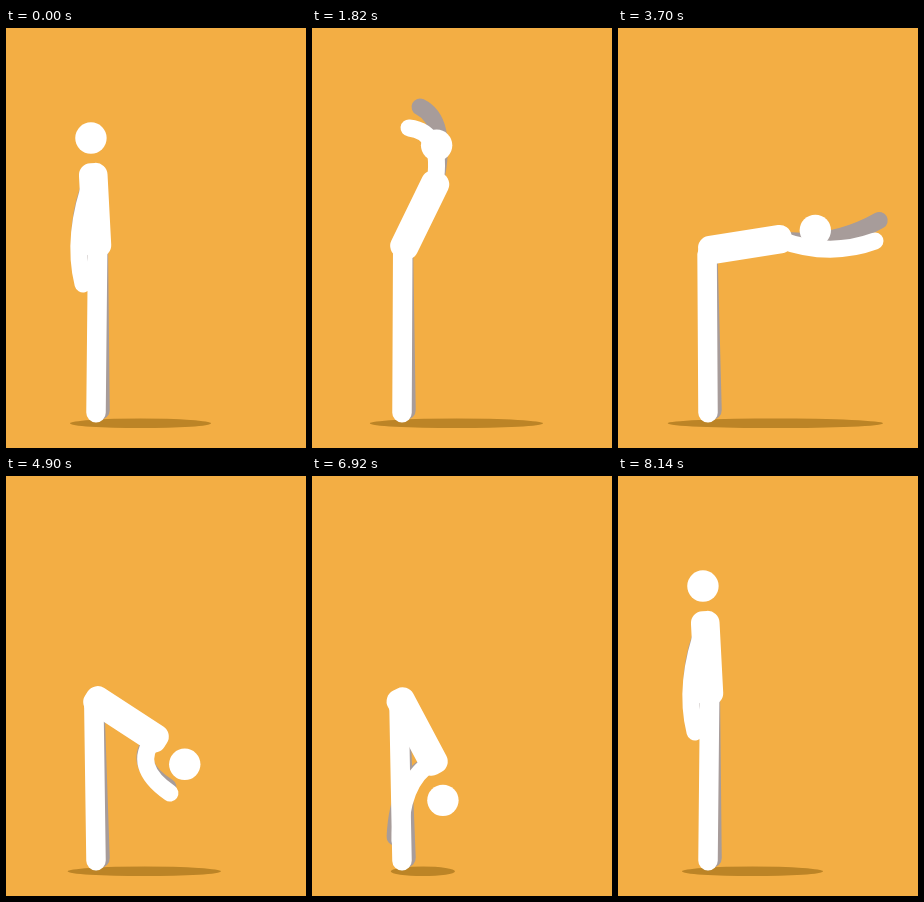
An HTML page with a canvas that plays this animation: 300 by 420 pixels, repeating every 8160 ms.

```html
<!DOCTYPE html>
<html lang="en">
<head>
<meta charset="utf-8">
<title>Forward bend</title>
<style>
html, body { margin: 0; width: 100%; height: 100%; overflow: hidden; background: #f3ae44; }
canvas { display: block; }
</style>
</head>
<body>
<canvas width="300" height="420"></canvas>
<script>
const ctx = document.querySelector('canvas').getContext('2d');
const LOOP = 8160, LEAD = 20, HIP = [89, 220.6];
const WHITE = '#fff', GREY = '#a79c9a';

// A pose is reached at time t and kept for hold ms. Angles are degrees
// clockwise from upright; shadow is the x of the shadow's right end.
const pose = (t, hold, lean, tilt, shadow, elbow, hand) =>
  (hold ? [t, t + hold] : [t]).map(t => ({ t, values: [lean, tilt, shadow, ...elbow, ...hand] }));

const keys = [
  pose(0, 40, -3, 0.9, 205, [65, 208], [77, 256]),        // stand
  pose(840, 0, 2, -1, 213, [155, 160], [212, 150]),       // arms forward
  pose(1840, 0, 26, -7, 231, [131.5, 103.5], [97, 100]),  // hands behind head
  pose(2260, 160, 37, -8, 239, [143, 105], [136, 53]),    // stretch up
  pose(3060, 0, 53, -8, 247.5, [171, 128], [155, 97]),    // lean
  pose(3720, 0, 81, -0.6, 265, [211, 230], [257, 213]),   // reach out
  pose(4040, 0, 88, 1, 275, [213, 240], [266, 224]),      // level
  pose(4920, 0, 123, 4, 215, [125, 290], [164, 317]),     // fold
  pose(6720, 600, 152, 6, 143, [88, 304], [88, 365])      // hands to heels
].flat();

// Key i, continued periodically in both directions.
function key(i) {
  const n = keys.length, turn = Math.floor(i / n), k = keys[i - turn * n];
  return { t: k.t + turn * LOOP, values: k.values };
}

// Smooth interpolation that never overshoots the poses.
function sample(t) {
  let i = keys.length - 1;
  while (keys[i].t > t) i--;
  const [a, b, c, d] = [-1, 0, 1, 2].map(k => key(i + k));
  const h = c.t - b.t, u = (t - b.t) / h, v = 1 - u;
  return b.values.map((from, j) => {
    const rate = (p, q) => (q.values[j] - p.values[j]) / (q.t - p.t);
    const slope = (m, n) => m * n > 0 ? 2 * m * n / (m + n) : 0;
    const mid = rate(b, c);
    return from + (c.values[j] - from) * u * u * (3 - 2 * u)
      + h * u * v * (slope(rate(a, b), mid) * v - slope(mid, rate(c, d)) * u);
  });
}

const rad = deg => deg * Math.PI / 180;
const polar = ([x, y], deg, r) => [x + r * Math.sin(rad(deg)), y - r * Math.cos(rad(deg))];
const smoothstep = (a, b, x) => {
  const u = Math.min(1, Math.max(0, (x - a) / (b - a)));
  return u * u * (3 - 2 * u);
};

function limb(color, width, from, mid, to) {
  ctx.strokeStyle = color;
  ctx.lineWidth = width;
  ctx.beginPath();
  ctx.moveTo(...from);
  ctx.quadraticCurveTo(...mid, ...to);
  ctx.stroke();
}

const leg = (color, top, foot) => limb(color, 19.5, top, top, foot);

function ellipse(color, x, y, rx, ry) {
  ctx.fillStyle = color;
  ctx.beginPath();
  ctx.ellipse(x, y, rx, ry, 0, 0, 2 * Math.PI);
  ctx.fill();
}

function torso(lean) {
  ctx.save();
  ctx.translate(...HIP);
  ctx.rotate(rad(lean));
  ctx.fillStyle = WHITE;
  ctx.beginPath();
  ctx.roundRect(-12.2, -85.6, 28.6, 94.5, 12);
  ctx.fill();
  ctx.restore();
}

function draw(now) {
  const [lean, tilt, right, ex, ey, hx, hy] = sample((now + LEAD) % LOOP);
  ctx.fillStyle = '#f3ae44';
  ctx.fillRect(0, 0, 300, 420);
  ctx.lineCap = 'round';

  const left = 64 - 0.238 * (right - 205);
  ellipse('#bc8426', (left + right) / 2, 395.3, (right - left) / 2, 4.8);

  // The far arm is the near one shifted by perspective, most when raised.
  const shoulder = polar(HIP, lean + 1.7, 72.6);
  const dx = 17 - 0.06 * hy, dy = 17 * smoothstep(200, 350, hy) - 21;
  limb(GREY, 17, shoulder, [ex + dx / 2, ey + dy / 2], [hx + dx, hy + dy]);

  const legTop = 91.5 - 0.03 * lean;
  leg(GREY, [legTop + 0.8, 226], [94, 382]);
  leg(WHITE, [legTop, 226], [90, 384.7]);
  torso(lean);
  limb(WHITE, 17, shoulder, [ex, ey], [hx, hy]);

  const turn = lean + tilt;
  ellipse(WHITE, ...polar(HIP, turn, 110.5 - 2 * Math.sin(rad(2 * turn))), 15.7, 15.7);
}

const start = performance.now();
function tick() {
  draw(performance.now() - start);
  requestAnimationFrame(tick);
}
tick();
</script>
</body>
</html>
```
